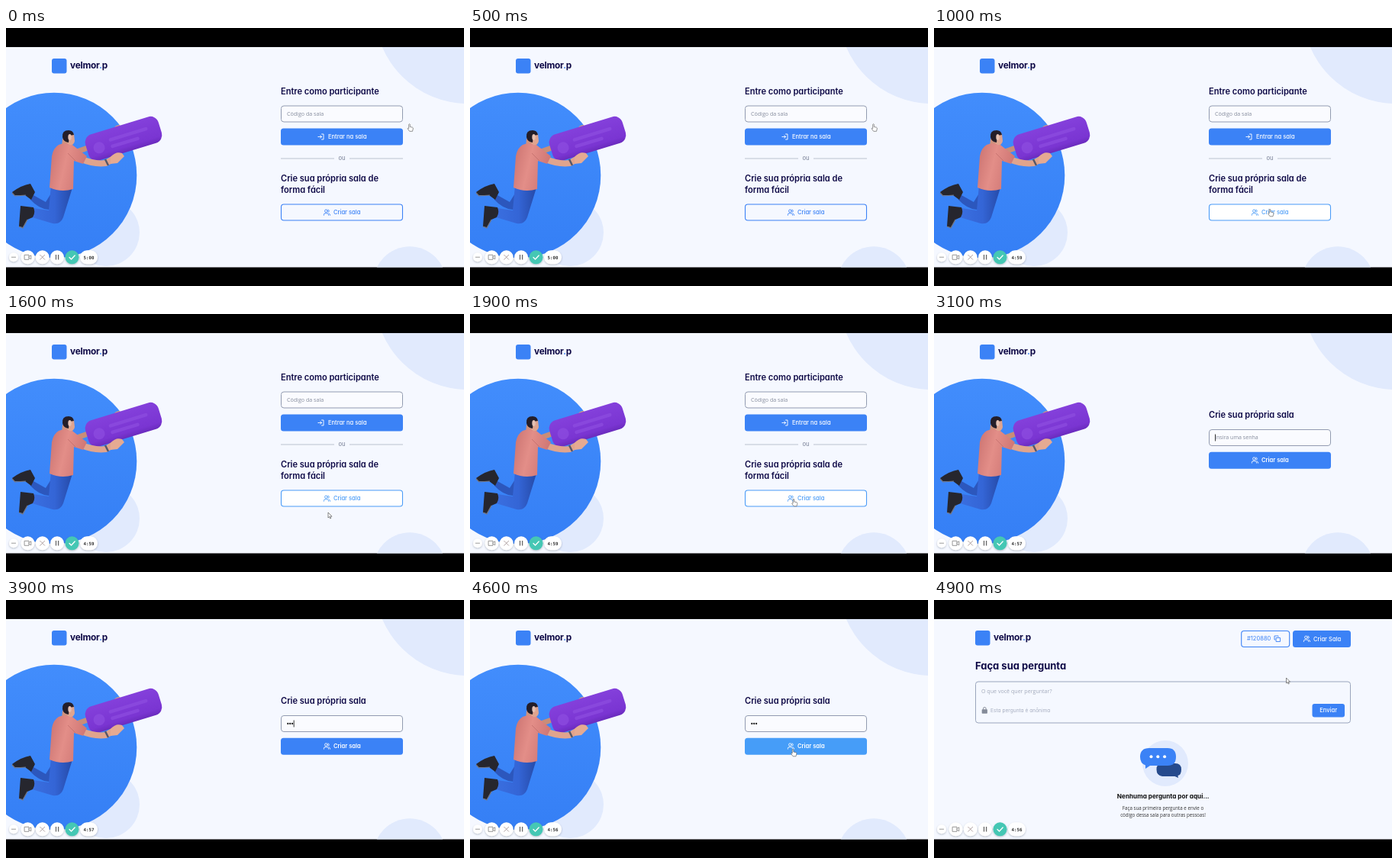
Animation, 600 px wide and 338 px high, one loop 5 s. Source, as an HTML page:

```html
<!DOCTYPE html>
<html lang="pt-BR">
<head>
<meta charset="utf-8">
<title>Sala de perguntas</title>
<style>
  html, body { margin: 0; width: 100%; height: 100%; overflow: hidden; background: #000; }
  svg { display: block; width: 100vw; height: 100vh; }
  text { font-family: Inter, sans-serif; font-feature-settings: "cv11"; fill: #0f0a47; }
  .h { font-size: 11.05px; font-weight: 600; }
  .b { font-size: 7.55px; font-weight: 500; fill: currentColor; }
  .body { font-family: "Open Sans", sans-serif; font-size: 7.1px; fill: #858c9c; }
  .brand { font-size: 11.8px; font-weight: 700; letter-spacing: -.2px; }
  .clock { font: bold 5.8px "DejaVu Sans Mono", monospace; fill: #333; }
  .box { fill: #fff; fill-opacity: .5; stroke: #929bb0; }
  .line { fill: none; stroke: currentColor; stroke-width: .9; stroke-linecap: round; stroke-linejoin: round; }
</style>
</head>
<body>
<svg viewBox="0 0 600 338" preserveAspectRatio="none">
  <defs>
    <linearGradient id="disc" x1="0" y1="0" x2="0" y2="1">
      <stop offset="0" stop-color="#428dfc"/><stop offset="1" stop-color="#357ff5"/>
    </linearGradient>
    <linearGradient id="shirt" x1="0" y1="0" x2="1" y2=".3">
      <stop offset="0" stop-color="#c9716f"/><stop offset=".5" stop-color="#e38e88"/><stop offset="1" stop-color="#cf7674"/>
    </linearGradient>
    <linearGradient id="jeans" x1="0" y1="0" x2="1" y2="0">
      <stop offset="0" stop-color="#3a6fe0"/><stop offset=".55" stop-color="#3465d6"/><stop offset="1" stop-color="#2549a6"/>
    </linearGradient>
    <linearGradient id="slab" x1="0" y1="0" x2="0" y2="1">
      <stop offset="0" stop-color="#8440db"/><stop offset=".8" stop-color="#7a35d2"/><stop offset="1" stop-color="#6a2bbd"/>
    </linearGradient>
    <filter id="soft" x="-40%" y="-40%" width="180%" height="190%">
      <feDropShadow dx="0" dy="1" stdDeviation="1.2" flood-color="#34405c" flood-opacity=".35"/>
    </filter>
    <clipPath id="page"><rect y="25" width="600" height="288.5"/></clipPath>
    <g id="users" class="line">
      <circle cx="3.4" cy="2.4" r="1.8"/>
      <path d="M.4 8V7.200Q.4 5.500 2.200 5.500H4.700Q6.500 5.500 6.500 7.200V8M6 .7Q7.300 1.200 7.300 2.400T6 4.100M7.400 5.700Q8.600 6.200 8.600 8"/>
    </g>
    <g id="login" class="line">
      <path d="M5 .5H7.500V7.500H5M.4 4H5M3.300 2.200 5.100 4 3.300 5.800"/>
    </g>
    <g id="brand">
      <rect x="60" y="40" width="19.500" height="19.500" rx="3" fill="#3b82f6"/>
      <text class="brand" x="84" y="53.300">velmor<tspan fill="#3b82f6">.</tspan>p</text>
    </g>
  </defs>

  <rect width="600" height="338"/>
  <g clip-path="url(#page)">
    <rect y="25" width="600" height="289" fill="#f5f8ff"/>

    <g id="home">
      <g fill="#e1eafd">
        <circle cx="605" cy="-23" r="122"/>
        <circle cx="529" cy="334" r="47.700"/>
        <circle cx="131" cy="268" r="44"/>
      </g>
      <circle cx="63" cy="193" r="108.300" fill="url(#disc)"/>
      <use href="#brand"/>

      <g id="figure">
        <path d="M90 163 107 157" stroke="#c98d78" stroke-width="7" stroke-linecap="round"/>
        <path d="M140 133Q144 126 149 127L152 132Z" fill="#d59a83"/>
        <g transform="translate(154 145) rotate(-17)">
          <rect x="-50" y="-18" width="100" height="36" rx="11" fill="url(#slab)"/>
          <g fill="#9050e2" opacity=".62">
            <circle cx="-34" cy="2" r="7.500"/>
            <rect x="-19" y="-6" width="53" height="4.500" rx="2.200"/>
            <rect x="-19" y="3" width="39" height="4.500" rx="2.200"/>
          </g>
        </g>
        <path d="M62 212 52 228 36 219 32 225Q43 237 56 238L76 232 83 214Z" fill="#2c57bd"/>
        <path d="M59 206H88L75 248Q71 258 61 256L34 248 36 236 56 239Z" fill="url(#jeans)"/>
        <g fill="#26262e">
          <path d="M8 215Q20 206 32 204L38 215 33 225 25 219 11 219Z"/>
          <path d="M19 233 36 235Q39 242 35 248L28 251 22 261 17 260Z"/>
        </g>
        <path d="M8 216 12 220 26 219M17 260 22 262 28 251" fill="none" stroke="#75747b" stroke-width="1.200"/>
        <path d="M97 171Q115 179 131 177L146 168" fill="none" stroke="#e0a48d" stroke-width="8" stroke-linecap="round" stroke-linejoin="round"/>
        <path d="M137 169Q144 161 152 164L155 168 151 172 146 177 137 178Z" fill="#e5aa92"/>
        <path d="M130 172 134 180" stroke="#56586a" stroke-width="2.500"/>
        <path d="M74 145 88 148 87 157 73 156Z" fill="#cf927c"/>
        <path d="M69 153Q78 149 88 154L106 168 101 178 89 174 88 211Q72 216 57 209L60 168Q62 157 69 153Z" fill="url(#shirt)"/>
        <path d="M81 164 91 174" stroke="#b96664" stroke-width="1" opacity=".6"/>
        <path d="M78 138Q85 134 89 139L90 148Q89 154 83 153L77 148Z" fill="#dfa48f"/>
        <path d="M74 143Q73 134 82 134 88 134 89 140L83 141 82 150Q75 149 74 143Z" fill="#241e29"/>
        <ellipse cx="83.500" cy="143" rx="2.200" ry="4" fill="#e5c1b3"/>
      </g>

      <g id="join">
        <text class="h" x="360" y="87">Entre como participante</text>
        <rect class="box" x="360.500" y="102" width="159" height="21" rx="3.500"/>
        <text class="body" x="368" y="115">Código da sala</text>
        <rect x="360" y="131.500" width="160" height="22" rx="3.500" fill="#3b82f6"/>
        <g color="#fff">
          <use href="#login" x="408.500" y="138.500"/>
          <text class="b" x="422" y="145.200">Entrar na sala</text>
        </g>
        <path d="M360 171H430M450 171H520" stroke="#b4bac9" stroke-width=".9"/>
        <text class="b" x="440" y="173.300" text-anchor="middle" color="#8a91a5">ou</text>
        <text class="h" x="360" y="201">Crie sua própria sala de</text>
        <text class="h" x="360" y="215.600">forma fácil</text>
        <g id="outline" color="#3b82f6">
          <rect id="outlineBox" x="360.500" y="231" width="159" height="21" rx="3.500" stroke="currentColor" stroke-width="1.100"/>
          <use href="#users" x="416" y="237.300"/>
          <text class="b" x="429" y="244.200">Criar sala</text>
        </g>
      </g>

      <g id="create">
        <text class="h" x="360" y="136.300">Crie sua própria sala</text>
        <rect class="box" x="360.500" y="151.500" width="159" height="21" rx="3.500"/>
        <text id="hint" class="body" x="368" y="164.400">Insira uma senha</text>
        <g id="dots" fill="#222">
          <circle cx="369.300" cy="162" r="1.150"/><circle cx="372.200" cy="162" r="1.150"/><circle cx="375.100" cy="162" r="1.150"/>
        </g>
        <rect id="caret" y="157.500" width=".9" height="9" fill="#222"/>
        <rect id="solid" x="360" y="180.700" width="160" height="22" rx="3.500"/>
        <g color="#fff">
          <use href="#users" x="416" y="187.200"/>
          <text class="b" x="429" y="194.200" style="font-weight:600">Criar sala</text>
        </g>
      </g>
    </g>

    <g id="room">
      <use href="#brand" x="-6"/>
      <g color="#3b82f6">
        <rect x="402.700" y="40.500" width="63" height="21" rx="3.500" fill="#f5f8ff" stroke="currentColor" stroke-width="1.100"/>
        <text class="b" x="410" y="53.400" style="font-weight:400">#120880</text>
        <path class="line" d="M448.500 49.500H453.500V54.500H448.500ZM447 52H446V47H451V48"/>
        <rect x="470" y="40" width="76" height="22" rx="3.500" fill="currentColor"/>
        <rect x="495.500" y="136" width="42.500" height="17.500" rx="3" fill="currentColor"/>
      </g>
      <g color="#fff">
        <use href="#users" x="484" y="46.500"/>
        <text class="b" x="497" y="53.500">Criar Sala</text>
      </g>
      <text x="54" y="90.800" style="font-size:13px;font-weight:700">Faça sua pergunta</text>
      <rect x="54.500" y="107" width="491" height="54" rx="3.500" fill="none" stroke="#9aa5bc"/>
      <text class="body" x="62" y="121.500" style="fill:#a3aabb">O que você quer perguntar?</text>
      <rect x="62.700" y="143.300" width="7.200" height="5.500" rx=".8" fill="#858b99"/>
      <path d="M64.500 144V142.300A1.800 1.800 0 0 1 68.100 142.300V144" fill="none" stroke="#858b99"/>
      <text x="74" y="147" style="font-size:6.600px;fill:#a7aec0">Esta pergunta é anônima</text>
      <text class="b" x="516.700" y="147.300" text-anchor="middle" color="#fff">Enviar</text>
      <circle cx="303" cy="214" r="30" fill="#e1eafd"/>
      <path d="M299 214H316Q324 214 324 222 324 229 319.500 230L320 233 315.500 231H299Q291.500 230 291.500 222T299 214Z" fill="#264a8c"/>
      <path d="M282 194H306Q317 194 317 205.500T306 217H283L277 221V216.500Q270 214 270 205.500 270 194 282 194Z" fill="#3b82f6"/>
      <g fill="#fff"><circle cx="284.500" cy="205.300" r="2"/><circle cx="293.300" cy="205.300" r="2"/><circle cx="302.100" cy="205.300" r="2"/></g>
      <g text-anchor="middle">
        <text x="300.200" y="260" style="font-size:8.200px;font-weight:700;fill:#111">Nenhuma pergunta por aqui...</text>
        <g style="font-size:6.200px">
          <text class="body" x="300" y="275.200" style="font-size:inherit;fill:#333">Faça sua primeira pergunta e envie o</text>
          <text class="body" x="300" y="283.800" style="font-size:inherit;fill:#333">código dessa sala para outras pessoas!</text>
        </g>
      </g>
    </g>

    <g id="recorder">
      <g fill="#fff" filter="url(#soft)">
        <circle cx="10" cy="300.300" r="6"/><circle cx="28.500" cy="300.300" r="9"/>
        <circle cx="47.700" cy="300.300" r="9"/><circle cx="67" cy="300.300" r="9"/>
        <circle cx="86.500" cy="300.300" r="9" fill="#45c7b4"/>
        <rect x="97" y="291.300" width="23" height="18" rx="9"/>
      </g>
      <g fill="#777"><circle cx="8" cy="300.300" r=".7"/><circle cx="10" cy="300.300" r=".7"/><circle cx="12" cy="300.300" r=".7"/></g>
      <path class="line" color="#8d8d8d" d="M24.500 297.300H30V303.300H24.500ZM30 299.500 32.800 297.800V302.800L30 301.100"/>
      <path class="line" color="#a99a9a" d="M44.700 297.300 50.700 303.300M50.700 297.300 44.700 303.300"/>
      <path d="M65.500 297V303.600M68.600 297V303.600" stroke="#666" stroke-width="1.300"/>
      <path class="line" color="#fff" d="M83 300.500 85.500 303 90.200 298" style="stroke-width:1.300"/>
      <text id="clock" class="clock" x="108.500" y="302.500" text-anchor="middle">5:00</text>
    </g>
  </g>

  <g id="cursor" stroke-linejoin="round">
    <path id="arrow" d="M0 0V7L1.600 5.600 2.700 8 3.800 7.500 2.700 5.200H5Z" fill="#fff" stroke="#555" stroke-width=".7"/>
    <path id="hand" d="M-.8 .8Q0-.5 .8 .8V4L4 4.700Q5 5 4.800 6.500L4 9.800H.2L-2.400 6.300Q-2.300 5.200-.8 6Z" fill="#fff" stroke="#666" stroke-width=".7"/>
  </g>
</svg>
<script>
const LOOP = 5000, STEP = 100;
const $ = id => document.getElementById(id);
const show = (id, on) => $(id).setAttribute("display", on ? "inline" : "none");
const within = (t, a, b) => t >= a && t < b;

// time, x, y of the pointer tip
const path = [
  [0, 528.5, 125.5], [500, 528.5, 125.5], [600, 512, 150], [800, 472, 208],
  [1000, 440, 237], [1400, 425, 246], [1600, 422, 260], [1800, 424, 243],
  [2000, 424, 241], [4000, 418, 172], [4200, 421, 190], [4300, 423, 195],
  [4600, 423, 195], [4700, 444, 138], [4800, 461.5, 102], [5000, 461.5, 102]
];
const typed = [3500, 3700, 3900];
const hands = [[0, 600], [1000, 1600], [1700, 2100], [4100, 4700]];

function place(t) {
  const i = path.findIndex(p => p[0] > t);
  const [t0, x0, y0] = path[i - 1], [t1, x1, y1] = path[i];
  const k = (t - t0) / (t1 - t0);
  return [x0 + (x1 - x0) * k, y0 + (y1 - y0) * k];
}

function draw(t) {
  show("home", t < 4700);
  show("room", t >= 4700);
  show("join", t < 2000);
  show("create", t >= 2000);

  const over = within(t, 1000, 2000);
  $("outline").setAttribute("color", over ? "#4b9cf7" : "#3b82f6");
  $("outlineBox").setAttribute("fill", over ? "#fff" : "#f5f8ff");
  $("solid").setAttribute("fill", t >= 4200 ? "#469df8" : "#3b82f6");

  const count = typed.filter(at => t >= at).length;
  show("hint", !count);
  [...$("dots").children].forEach((dot, i) => dot.setAttribute("display", i < count ? "inline" : "none"));
  show("caret", within(t, 2900, 3400) || within(t, 3500, 4200));
  $("caret").setAttribute("x", 368 + count * 2.9);

  const left = 300 - Math.floor(t / 1000);
  $("clock").textContent = left === 300 ? "5:00" : "4:" + (left - 240);

  const [x, y] = place(t);
  const hand = hands.some(([a, b]) => within(t, a, b));
  $("cursor").setAttribute("transform", `translate(${x} ${y})`);
  show("cursor", !within(t, 2100, 4100));
  show("hand", hand);
  show("arrow", !hand);
}

const start = performance.now();
function tick() {
  const t = (performance.now() - start) % LOOP;
  draw(Math.floor(t / STEP) * STEP);
  requestAnimationFrame(tick);
}
tick();
</script>
</body>
</html>
```
